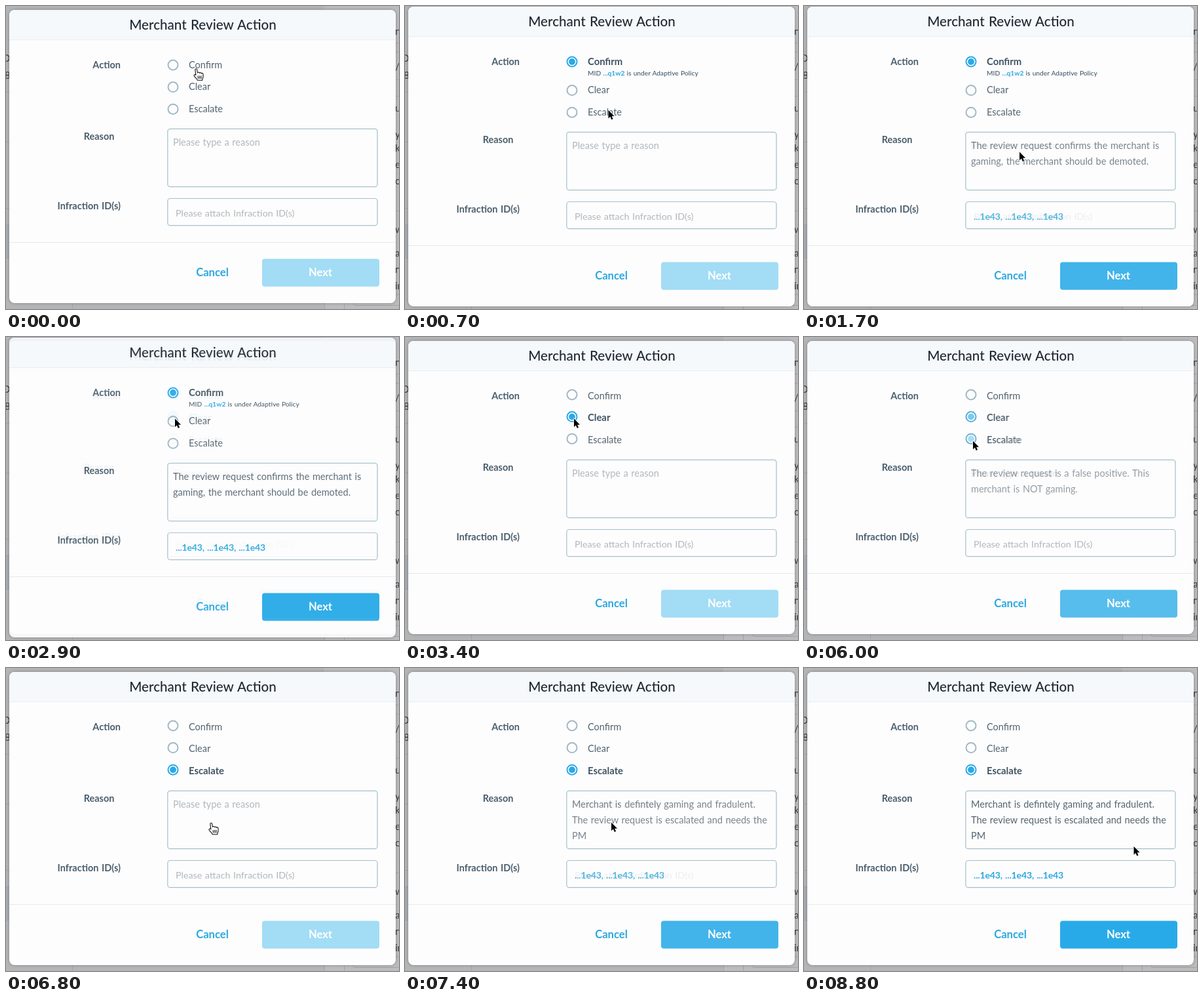
An HTML page for the animation above (8900 ms loop, 600x462 px).

```html
<!DOCTYPE html>
<html lang="en">
<head>
<meta charset="utf-8">
<title>Merchant Review Action</title>
<style>
  html, body { margin: 0; width: 100%; height: 100%; overflow: hidden; background: #b4b5b7; }
  svg { display: block; width: 600px; height: 462px; }
  text { font-family: Lato, "Open Sans", sans-serif; font-size: 14.5px; word-spacing: .06em; fill: #54646f; }
  .title { font-size: 20.6px; font-weight: 500; fill: #1f2933; text-anchor: middle; }
  .label { font-weight: 700; fill: #4a5e6c; text-anchor: end; }
  .picked { font-size: 14.8px; font-weight: 700; fill: #405462; }
  .hint { fill: #b1b7bb; }
  .attach { font-size: 14.3px; }
  .note { font-size: 10.2px; font-weight: 500; fill: #465a68; }
  .blue { fill: #2ba7df; font-weight: 700; }
  .ids { font-size: 14px; letter-spacing: -.01em; }
  .btn { font-size: 16.6px; font-weight: 700; text-anchor: middle; }
  .field { fill: #fdfdfe; stroke: #a5c0c7; stroke-width: 1.2; }
  .back { font-size: 15px; fill: #3a3b3d; }
</style>
</head>
<body>
<svg id="stage" viewBox="0 0 600 462" xmlns="http://www.w3.org/2000/svg">
  <defs>
    <filter id="blur" x="-5%" y="-5%" width="110%" height="110%"><feGaussianBlur stdDeviation="2.5"/></filter>
    <g id="page"></g>
  </defs>
  <g id="screens"></g>
  <g id="cursor">
    <path id="arrow" transform="scale(.87)" d="M0 0V14.6L3.3 11.5L5.5 16.6L8.1 15.5L5.9 10.5H10.4Z"
      fill="#000" stroke="#fff" stroke-width="1.3" paint-order="stroke"/>
    <g id="hand" stroke="#111" stroke-width="1.1" stroke-linejoin="round" stroke-linecap="round">
      <path fill="#fff" d="M-2.2 10.4L-3.2 2.4C-3.4 .4-.8 .2-.4 2L.5 7C.8 5.5 3.3 5.6 3.4 7.2
        C3.9 6 6.2 6.3 6.2 7.9C6.9 6.9 9 7.3 9 9V12.4C9 14.6 7.8 15.4 7.7 18.2H.2
        C-.4 15.8-3.4 14-4.9 11.4C-5.6 9.8-3.6 8.8-2.2 10.4Z"/>
      <path fill="none" d="M1.2 11.8L1.5 15.4M3.7 11.8V15.4M6 11.8L5.9 15.4"/>
    </g>
  </g>
</svg>
<script>
const $ = id => document.getElementById(id);
const LOOP = 8900, STEP = 100, FADE = 500;

const text = (x, y, s, cls = "") => `<text x="${x}" y="${y}" class="${cls}">${s}</text>`;
const rect = (x, y, w, h, attrs) => `<rect x="${x}" y="${y}" width="${w}" height="${h}" ${attrs}/>`;
const line = (x1, y1, x2, y2, c) => `<path d="M${x1} ${y1}L${x2} ${y2}" stroke="${c}" fill="none"/>`;

// Dimmed page behind the dialog
$("page").innerHTML =
  rect(0, 0, 600, 462, 'fill="#b4b5b7"') +
  rect(486, 0, 114, 462, 'fill="#bcbcbe"') +
  [131, 207, 308, 333, 384].map(y => line(0, y + .5, 6, y + .5, "#a0a3a8")).join("") +
  rect(0, 334, 6, 50, 'fill="#a9adb3"') +
  [101, 486, 516].map(x => line(x + .5, 452, x + .5, 462, "#a3a4a6")).join("") +
  rect(530, 440, 80, 16.5, 'rx="3" fill="none" stroke="#a3a4a6"') +
  [56, 70, 112, 137, 312].map(y => line(594, y + .5, 600, y + .5, "#a6a7a9")).join("") +
  text(-5, 85, "D", "back") + text(-2, 111, "8", "back") +
  [[44, "n"], [98, "/"], [161, "u"], [201, "y"], [222, "k"], [247, "e"], [272, "o"],
   [346, "w"], [382, "a"], [407, "n"], [432, "in"]]
    .map(([y, s]) => text(594, y, s, "back")).join("");

const NAMES = ["Confirm", "Clear", "Escalate"];

function radio(y, on) {
  const c = on ? "#2aa9e6" : "#a2b9c4";
  return `<circle cx="255" cy="${y}" r="7.5" fill="#fdfdfe" stroke="${c}" stroke-width="2"/>` +
    (on ? `<circle cx="255" cy="${y}" r="4.9" fill="${c}"/>` : "");
}

// pick: chosen option or -1; lines: typed reason; ids: whether ids are attached
function screen({ pick, lines = [], ids = false }) {
  const grow = pick === 0 ? 5 : 0;
  const top = 6 - grow, low = 447 + 2 * grow;
  const firstDot = pick > 0 ? 88 : 90;
  const full = lines.length > 0;
  const upper =
    rect(5, top, 590, low, 'rx="8" fill="#000" opacity=".28" filter="url(#blur)"') +
    rect(5, top, 590, low, 'rx="8" fill="#fdfdfe"') +
    `<path d="M5 ${top + 45}V${top + 8}a8 8 0 0 1 8-8H587a8 8 0 0 1 8 8V${top + 45}Z" fill="#f6f9fc"/>` +
    line(5, top + 45.5, 595, top + 45.5, "#e9eef2") +
    text(300.5, 35.5 - grow, "Merchant Review Action", "title") +
    text(175, 94.5 - grow, "Action", "label");
  const options = NAMES.map((name, i) => {
    const dy = i * 33.6 + (i ? grow : -grow);
    return radio(firstDot + dy, i === pick) +
      text(279, 94.5 + dy, name, i === pick ? "picked" : "");
  }).join("");
  const note = grow
    ? text(279, 106, 'MID <tspan class="blue">...q1w2</tspan> is under Adaptive Policy', "note") : "";
  const form =
    text(165.5, 204.3, "Reason", "label") +
    rect(246.8, 187.3, 320.2, 88.4, 'rx="4" class="field"') +
    (full ? lines.map((s, i) => text(255, 212.7 + 24 * i, s)).join("")
          : text(255, 212.7, "Please type a reason", "hint")) +
    text(175, 310.3, "Infraction ID(s)", "label") +
    rect(246.8, 293.5, 320.2, 41.2, 'rx="4" class="field"') +
    (ids ? text(259, 320.7, "...1e43, ...1e43, ...1e43", "blue ids")
         : text(259, 320.7, "Please attach Infraction ID(s)", "hint attach")) +
    line(5, 360.5, 595, 360.5, "#e6e9ec") +
    text(315, 412.3, "Cancel", "btn blue") +
    rect(391, 385.6, 179, 42.2, `rx="4" fill="${full ? "#29aae8" : "#a2dcf5"}"`) +
    `<text x="480" y="412.3" class="btn" style="fill:#fff">Next</text>`;
  return `<g class="screen"><use href="#page"/>${upper}${options}${note}` +
    `<g transform="translate(0 ${grow})">${form}</g></g>`;
}

// Each screen dissolves in over the previous one, beginning at its time
const shows = [
  { at: -FADE, pick: -1 },
  { at: 80, pick: 0 },
  { at: 1350, pick: 0, ids: true, lines: ["The review request confirms the merchant is",
    "gaming, the merchant should be demoted."] },
  { at: 2820, pick: 1 },
  { at: 4210, pick: 1, lines: ["The review request is a false positive. This", "merchant is NOT gaming."] },
  { at: 5790, pick: 2 },
  { at: 7050, pick: 2, ids: true, lines: ["Merchant is defintely gaming and fradulent.",
    "The review request is escalated and needs the", "PM"] }
];
$("screens").innerHTML = shows.map(screen).join("");
const layers = [...document.querySelectorAll(".screen")];

// Pointer stops: time, x, y
const stops = [
  [0, 292, 95], [300, 292, 95], [1100, 329, 222.5], [1900, 329, 222.5], [2600, 258, 124.5],
  [3400, 258, 124.5], [3800, 306, 216], [4800, 306, 216], [5400, 258, 158.5],
  [6000, 258, 158.5], [6400, 315, 235.5], [8000, 315, 235.5], [8800, 503.5, 272], [LOOP, 503.5, 272]
];
const hovers = [[0, 100], [1100, 1400], [2500, 2900], [3800, 4200], [5300, 5800], [6700, 7100]];

const ease = p => { p = Math.min(1, Math.max(0, p)); return p * p * (3 - 2 * p); };

function draw(t) {
  const mix = shows.map(s => ease((t - s.at) / FADE));
  const base = mix.lastIndexOf(1);
  layers.forEach((g, i) => {
    g.style.display = i < base || mix[i] === 0 ? "none" : "";
    g.setAttribute("opacity", mix[i]);
  });
  const i = stops.findIndex((s, n) => n && t < s[0]);
  const [t0, x0, y0] = stops[i - 1], [t1, x1, y1] = stops[i];
  const p = ease((t - t0) / (t1 - t0));
  $("cursor").setAttribute("transform", `translate(${x0 + (x1 - x0) * p} ${y0 + (y1 - y0) * p})`);
  const hover = hovers.some(([a, b]) => t >= a && t < b);
  $("hand").style.display = hover ? "" : "none";
  $("arrow").style.display = hover ? "none" : "";
}

function tick() {
  draw(Math.floor((performance.now() % LOOP) / STEP) * STEP);
  requestAnimationFrame(tick);
}
tick();
</script>
</body>
</html>
```
